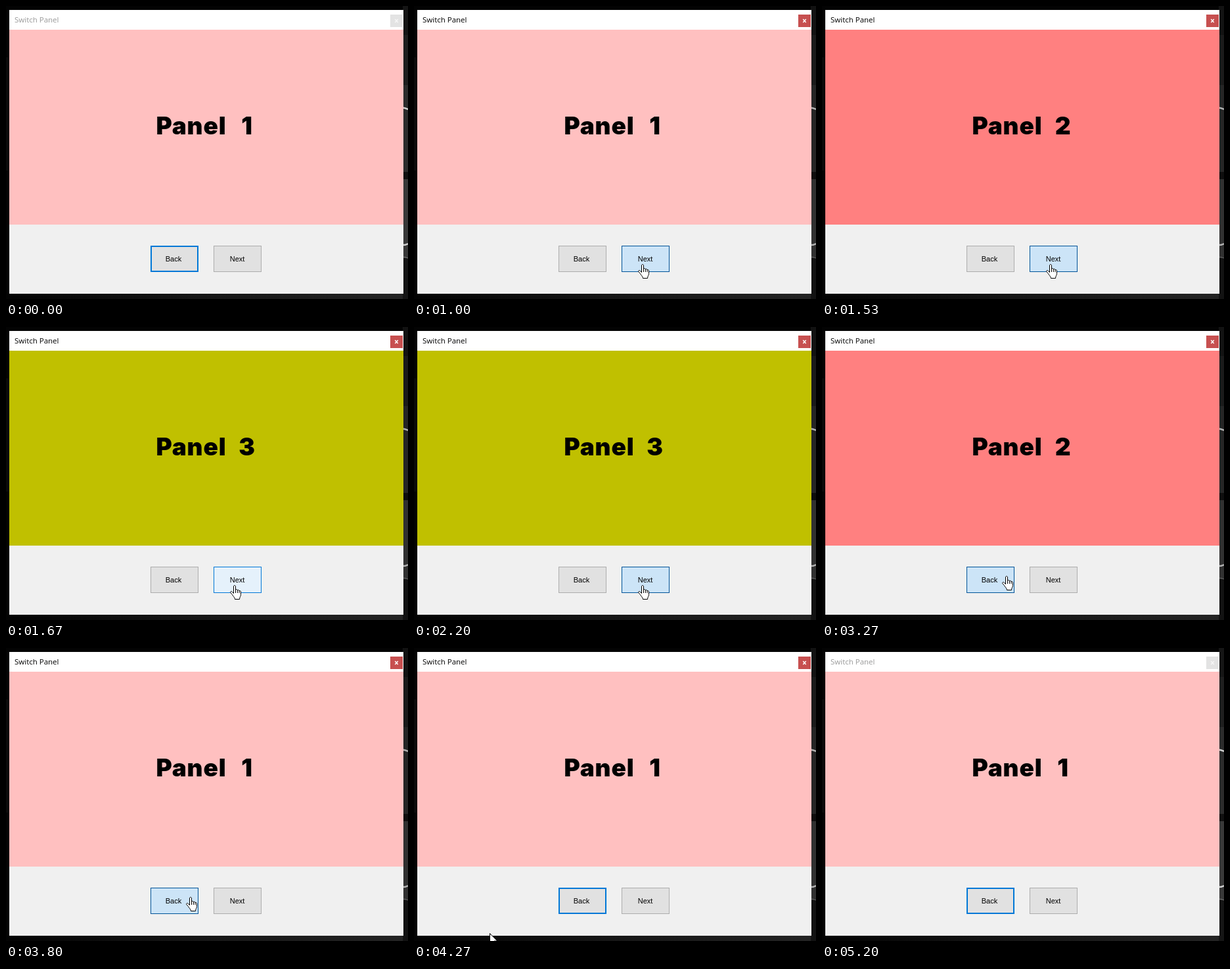
These frames come from a looping animation (612x445 px, 5340 ms). An HTML page:

```html
<!DOCTYPE html>
<html lang="en">
<head>
<meta charset="utf-8">
<title>Switch Panel</title>
<style>
  html, body { margin: 0; width: 100%; height: 100%; overflow: hidden; background: #000; }
  svg { display: block; width: 612px; height: 445px; }
  .title { font: 11.5px "Open Sans", "Noto Sans", sans-serif; }
  .big { font: 900 37px Inter, "DejaVu Sans", sans-serif; letter-spacing: .8px; }
  .label { font: 11px "Liberation Sans", Arial, sans-serif; text-anchor: middle; }
  .cursor { fill: #fff; stroke: #000; stroke-linejoin: round; }
</style>
</head>
<body>
<svg viewBox="0 0 612 445">
  <defs>
    <linearGradient id="floor">
      <stop offset="0" stop-color="#030303"/>
      <stop offset=".45" stop-color="#151515"/>
      <stop offset="1" stop-color="#242424"/>
    </linearGradient>
  </defs>

  <!-- desktop behind the window -->
  <rect width="612" height="445" fill="#030303"/>
  <rect y="78" width="5" height="172" fill="#0a0a0a"/>
  <rect y="436" width="612" height="9" fill="url(#floor)"/>
  <rect x="604" width="8" height="445" fill="#151515"/>
  <rect x="604" y="44" width="8" height="76" fill="#1e1e1e"/>
  <rect x="604" y="120" width="8" height="132" fill="#2b2b2b"/>
  <rect x="604" y="252" width="8" height="11" fill="#101010"/>
  <rect x="604" y="263" width="8" height="120" fill="#383838"/>
  <path d="M604 154.5Q608 155 612 157M604 363Q608 363 612 361" fill="none" stroke="#d0d0d0" stroke-width="2.5"/>
  <path d="M604 381Q608 381 612 383" fill="none" stroke="#777"/>
  <rect id="shade" x="605" width="7" height="445" opacity=".15"/>

  <!-- window -->
  <rect x="5" y="6" width="600" height="431" fill="#f0f0f0"/>
  <rect x="5" y="6" width="600" height="30" fill="#fff"/>
  <text id="title" class="title" x="13" y="25">Switch Panel</text>
  <rect id="close" x="585" y="13" width="19" height="19"/>
  <path id="cross" d="M592.3 20L596.7 25M596.7 20L592.3 25" stroke-width="1.5"/>
  <rect id="panel" x="5" y="36" width="600" height="296"/>
  <text class="big" x="228.5" y="195">Panel</text>
  <text id="digit" class="big" x="367" y="195" text-anchor="middle"></text>

  <rect id="back"/>
  <text class="label" x="255" y="388">Back</text>
  <rect id="next"/>
  <text class="label" x="352" y="388">Next</text>

  <path id="arrow" class="cursor" d="M.5.5V16.5L4.2 13L6.7 18.5L9.3 17.4L7 12H11.8Z"/>
  <g id="hand" class="cursor">
    <path d="M-.5 12.5V2C-.5 0 2.5 0 2.5 2V7.5C2.7 6 5.2 6.2 5.4 8C5.8 6.8 8 7.2 8.1 9C8.6 8 10.5 8.5 10.5 10.2V14.5C10.5 17 8.5 18 8.5 21.5H1.5C1.5 18.5-1.5 17-2.5 14.5L-5.2 11.5C-6 10-4 8.8-2.7 10.2Z"/>
    <path d="M2.5 7V12M5.4 8V12M8.1 9V12" fill="none"/>
  </g>
</svg>
<script>
const LOOP = 5340, RATE = 15 / 1000;
const COLORS = ['#ffc0c0', '#ff8080', '#c0c000'];
const BUTTON = { back: 220, next: 316 };
const PRESSED = [15, 23, 24, 33, 41, 49, 50, 57];
// pointer stops: tick, x, y
const STOPS = [
  [10, 318, 419], [13, 347, 392], [34, 347, 392], [39, 280, 378],
  [58, 280, 378], [65, 105, 436], [66, 97, 440], [67, 97, 440]
];
const $ = id => document.getElementById(id);

function set(id, attrs) {
  for (const name in attrs) $(id).setAttribute(name, attrs[name]);
}

function pointer(tick) {
  const i = STOPS.findIndex(s => s[0] > tick);
  if (i < 1) return null;
  const [t0, x0, y0] = STOPS[i - 1], [t1, x1, y1] = STOPS[i];
  const u = (tick - t0) / (t1 - t0), k = u * u * (3 - 2 * u);
  return { x: Math.round(x0 + (x1 - x0) * k), y: Math.round(y0 + (y1 - y0) * k) };
}

function panelAt(tick) {
  if (tick < 16 || tick >= 51) return 1;
  return tick >= 25 && tick < 42 ? 3 : 2;
}

function drawButton(id, hot, pressed, focused) {
  const w = focused && !hot ? 2 : 1;
  const stroke = hot && pressed ? '#005499' : hot || focused ? '#0078d7' : '#adadad';
  const fill = !hot ? '#e1e1e1' : pressed ? '#cce4f7' : '#e5f1fb';
  set(id, {
    x: BUTTON[id] + w / 2, y: 364 + w / 2, width: 73 - w, height: 40 - w,
    fill, stroke, 'stroke-width': w
  });
}

function draw(ms) {
  const tick = Math.floor((ms % LOOP + 4) * RATE);
  const active = tick >= 15 && tick < 78;
  const n = panelAt(tick), p = pointer(tick);
  const over = id => !!p && p.x >= BUTTON[id] && p.x < BUTTON[id] + 73 && p.y >= 364 && p.y < 404;
  const focus = tick >= 15 && tick < 41 ? 'next' : 'back';

  set('title', { fill: active ? '#000' : '#999' });
  set('close', { fill: active ? '#c75050' : '#e3e3e3' });
  set('cross', { stroke: active ? '#fff' : '#f6f6f6' });
  set('shade', { visibility: active ? 'visible' : 'hidden' });
  set('panel', { fill: COLORS[n - 1] });
  $('digit').textContent = n;
  for (const id in BUTTON) drawButton(id, over(id), PRESSED.includes(tick), focus === id);

  const shape = !p ? '' : over('back') || over('next') ? 'hand' : 'arrow';
  for (const id of ['hand', 'arrow']) {
    set(id, { visibility: id === shape ? 'visible' : 'hidden' });
    if (p) set(id, { transform: `translate(${p.x} ${p.y})` });
  }
}

const start = performance.now();
function loop() {
  draw(performance.now() - start);
  requestAnimationFrame(loop);
}
loop();
</script>
</body>
</html>
```
